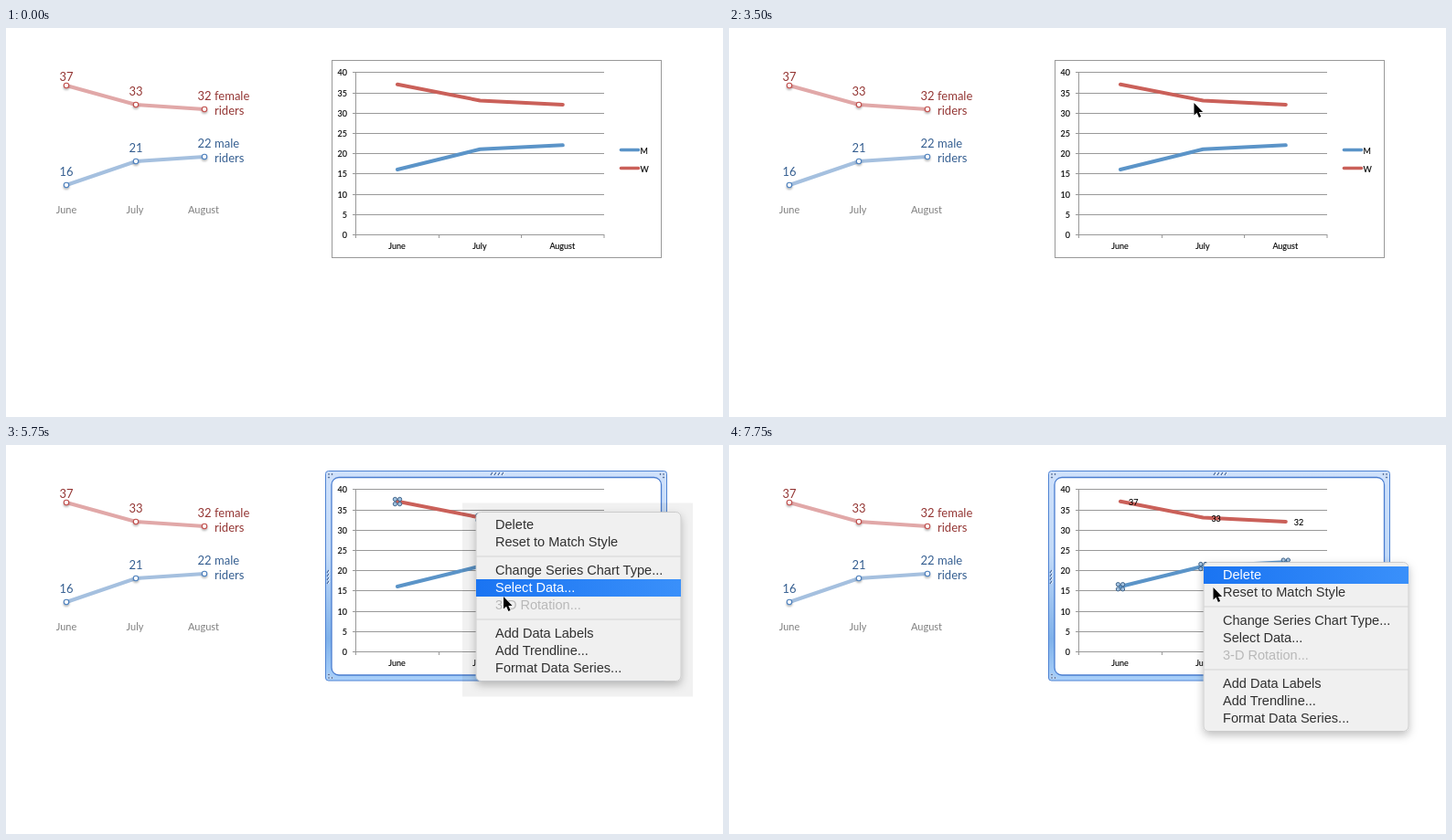
These frames come from a looping animation (784 px wide and 426 px high, 8000 ms). An HTML page:

```html
<!DOCTYPE html>
<html lang="en">
<head>
<meta charset="utf-8">
<title>Adding data labels</title>
<style>
  html, body { margin: 0; width: 100%; height: 100%; overflow: hidden; background: #fff; }
  svg { display: block; width: 784px; height: 426px; }
  text { font-family: Lato, sans-serif; white-space: pre; }
  .callout { font-size: 13px; }
  .month { font-size: 11px; fill: #808080; }
  .axis { font-size: 9px; fill: #000; stroke: #000; stroke-width: .12; }
  .menu text { font: 14.55px "Liberation Sans", Arial, sans-serif; fill: #303030; }
  .tip { font: 10.4px "Open Sans", sans-serif; }
</style>
</head>
<body>
<svg id="stage" viewBox="0 0 784 426">
  <defs>
    <linearGradient id="ring" x1="0" y1="0" x2="0" y2="1">
      <stop offset="0" stop-color="#cfe1fb"/>
      <stop offset=".4" stop-color="#c2daf8"/>
      <stop offset=".8" stop-color="#7fb1ea"/>
      <stop offset="1" stop-color="#a9d0fa"/>
    </linearGradient>
    <linearGradient id="highlight">
      <stop offset="0" stop-color="#1a74f2"/>
      <stop offset="1" stop-color="#3a90fa"/>
    </linearGradient>
    <filter id="dotShadow" x="-100%" y="-100%" width="300%" height="300%">
      <feDropShadow dx="0" dy="1.5" stdDeviation="1" flood-opacity=".35"/>
    </filter>
    <filter id="menuShadow" x="-20%" y="-20%" width="140%" height="140%">
      <feDropShadow dx="0" dy="4" stdDeviation="5" flood-opacity=".25"/>
    </filter>
  </defs>
</svg>
<script>
const NS = 'http://www.w3.org/2000/svg';
const stage = document.getElementById('stage');

function add(parent, tag, attrs = {}, content) {
  const node = document.createElementNS(NS, tag);
  for (const key in attrs) node.setAttribute(key, attrs[key]);
  if (content !== undefined) node.textContent = content;
  return parent.appendChild(node);
}
const group = (attrs = {}) => add(stage, 'g', attrs);
const label = (parent, x, y, content, attrs) => add(parent, 'text', { x, y, ...attrs }, content);
const line = (parent, d, stroke, width, more) =>
  add(parent, 'path', { d, stroke, 'stroke-width': width, fill: 'none', ...more });
const show = (node, visible) => { node.style.display = visible ? '' : 'none'; };

const months = ['June', 'July', 'August'];
const women = [37, 33, 32], men = [16, 21, 22];

function drawSummarySeries(values, ys, labelYs, name, pale, dark, ink) {
  const xs = [66, 142, 217];
  const g = group();
  const style = { class: 'callout', fill: ink };
  line(g, 'M' + xs.map((x, i) => `${x} ${ys[i]}`).join('L'), pale, 4);
  xs.forEach((x, i) => {
    add(g, 'circle', { cx: x, cy: ys[i], r: 2.7, fill: '#fff', stroke: dark, 'stroke-width': 1.1, filter: 'url(#dotShadow)' });
    label(g, x, labelYs[i], values[i], { ...style, 'text-anchor': 'middle' });
  });
  label(g, 228, labelYs[2], name, style);
  label(g, 228, labelYs[2] + 16, 'riders', style);
}
drawSummarySeries(women, [63, 84, 89], [57.5, 73.5, 78.5], 'female', '#e1a8a8', '#c0504d', '#943634');
drawSummarySeries(men, [172, 146, 141], [161.5, 135.5, 130.5], 'male', '#a5c0df', '#4f81bd', '#365f91');
months.forEach((m, i) => label(stage, 66 + 75 * i, 202.5, m, { class: 'month', 'text-anchor': 'middle' }));

// Chart border: plain, and the selected version
const plainBorder = group();
add(plainBorder, 'rect', { x: 356.5, y: 35.5, width: 360, height: 216, fill: '#fff', stroke: '#999' });

const selection = group();
add(selection, 'rect', { x: 349.5, y: 28.5, width: 373, height: 229.5, rx: 3, fill: 'url(#ring)', stroke: '#4f83d3' });
add(selection, 'rect', { x: 356, y: 35.5, width: 360.5, height: 216.5, rx: 8, fill: '#fff', stroke: '#4a7dd0', 'stroke-width': 1.3 });
function grip(x, y, vertical) {
  for (let i = 0; i < 4; i++) {
    const px = x + (vertical ? 0 : i * 4), py = y + (vertical ? i * 4 : 0);
    line(selection, `M${px + 1} ${py + 3}l2 -3`, '#fff', 1.2);
    line(selection, `M${px} ${py + 3}l2 -3`, '#3d5f96', 1.2);
  }
}
grip(530, 30); grip(530, 253.5);
grip(351, 137, true); grip(718, 137, true);
for (const [x, dx] of [[353, 1], [719, -1]])
  for (const [y, dy] of [[32, 1], [255, -1]])
    for (const [i, j] of [[0, 0], [1, 0], [0, 1]])
      add(selection, 'circle', { cx: x + dx * i * 3.5, cy: y + dy * j * 3.5, r: 1.2, fill: '#3d5f96', stroke: '#fff', 'stroke-width': .5 });

// Chart contents
const chart = group();
const chartX = i => 428 + 90.4 * i;
const chartY = v => 226 - v * 4.44;
for (let v = 0; v <= 40; v += 5) {
  const y = Math.round(chartY(v)) + .5;
  line(chart, `M379 ${y}H654`, '#999', 1);
  label(chart, 373, y + 3.5, v, { class: 'axis', 'text-anchor': 'end' });
}
line(chart, 'M382.5 48V230M473.5 226v4M563.5 226v4M654 226v4', '#999', 1);
months.forEach((m, i) => label(chart, chartX(i) - .5, 242, m, { class: 'axis', 'text-anchor': 'middle' }));

function drawChartSeries(values, color, name, legendY) {
  line(chart, 'M' + values.map((v, i) => `${chartX(i)} ${chartY(v)}`).join('L'), color, 4,
    { 'stroke-linecap': 'round', 'stroke-linejoin': 'round' });
  line(chart, `M672.5 ${legendY}H691.5`, color, 3.6, { 'stroke-linecap': 'round' });
  label(chart, 693.5, legendY + 4, name, { class: 'axis' });
  const handles = group();
  values.forEach((v, i) => {
    for (const dx of [-2.6, 2.6]) for (const dy of [-2.6, 2.6])
      add(handles, 'circle', { cx: chartX(i) + dx, cy: chartY(v) + dy + .3, r: 2.1, fill: '#a6c6e4', stroke: '#3e6288', 'stroke-width': 1 });
  });
  return handles;
}
const menHandles = drawChartSeries(men, '#5b94c8', 'M', 133.5);
const womenHandles = drawChartSeries(women, '#ca6059', 'W', 153.5);

const dataLabels = group();
women.forEach((v, i) => label(dataLabels, chartX(i) + 9, chartY(v) + 4.5, v, { class: 'axis' }));

const tooltip = group();
add(tooltip, 'rect', { x: 714, y: 221, width: 60, height: 16.5, fill: '#000', opacity: .1 });
add(tooltip, 'rect', { x: 713, y: 219, width: 60, height: 17, fill: '#ffffd6', stroke: '#ddd', 'stroke-width': .6 });
label(tooltip, 716, 231.5, 'Chart Area', { class: 'tip' });

// Context menu; item positions are relative to its top left corner
const items = [['Delete', 14], ['Reset to Match Style', 33], ['Change Series Chart Type...', 64],
  ['Select Data...', 83], ['3-D Rotation...', 102], ['Add Data Labels', 133],
  ['Add Trendline...', 152], ['Format Data Series...', 171]];
const menu = group({ class: 'menu' });
const haze = add(menu, 'rect', { x: -15, y: -10, width: 252, height: 212, fill: '#000', opacity: .055 });
add(menu, 'rect', { width: 224, height: 185, rx: 5.5, fill: '#f0f0f0', stroke: '#c4c4c4', 'stroke-width': .8, filter: 'url(#menuShadow)' });
const bar = add(menu, 'rect', { width: 224, height: 19, fill: 'url(#highlight)' });
line(menu, 'M0 48.5H224M0 117.5H224', '#d6d6d6', 1.2);
const itemTexts = items.map(([name, y]) => label(menu, 21, y + 4.5, name));

const cursorPath = 'M0 0V13.6L3.1 10.7L5.4 15.9L7.6 14.9L5.4 9.9H9.6Z';
const makeCursor = () => add(stage, 'path', { d: cursorPath, fill: '#000', stroke: '#fff', 'stroke-width': 1, 'paint-order': 'stroke' });
const strayCursor = makeCursor();
strayCursor.setAttribute('transform', 'translate(772 208)');
const cursor = makeCursor();

// Pointer positions by time; each is held until the next
const pointer = [
  [250, 467, 140], [500, 460, 108], [750, 444, 66], [1000, 424, 33], [1250, 432, 52],
  [1500, 402, 54], [1750, 376, 53], [2000, 366.5, 61], [2250, 412, 69], [2500, 464, 77],
  [2750, 484, 79], [3000, 501, 81], [3500, 508.5, 82],
  [5500, 527, 122], [5750, 544, 166], [6000, 555, 203], [6250, 546.5, 173], [6500, 533, 156],
  [6750, 520, 144], [7000, 513.5, 137], [7750, 529.5, 156]
];
const selectedItem = [[5000, -1], [5500, 2], [5750, 3], [6000, 5], [6250, -1], [7750, 0]];
const latest = (keys, t) => keys.filter(k => k[0] <= t).pop();

function render(t) {
  const within = (from, to = 8000) => t >= from && t < to;
  show(plainBorder, t < 4500);
  show(selection, within(4500));
  show(womenHandles, within(4500, 7250));
  show(menHandles, within(7250));
  show(dataLabels, within(6750));
  show(tooltip, within(6250, 6500));
  show(strayCursor, within(4000, 4500));

  const firstMenu = within(5000, 6250);
  show(menu, firstMenu || within(7500));
  show(haze, firstMenu);
  menu.setAttribute('transform', firstMenu ? 'translate(514 73.5)' : 'translate(519 128.5)');
  const active = (latest(selectedItem, t) || [0, -1])[1];
  show(bar, active >= 0);
  if (active >= 0) bar.setAttribute('y', items[active][1] - 9.5);
  itemTexts.forEach((node, i) => node.style.fill = i === active ? '#fff' : i === 4 ? '#b8b8b8' : '');

  const at = latest(pointer, t);
  show(cursor, !!at);
  if (at) cursor.setAttribute('transform', `translate(${at[1]} ${at[2]})`);
}

const start = performance.now();
(function tick() {
  render((performance.now() - start) % 8000);
  requestAnimationFrame(tick);
})();
</script>
</body>
</html>
```
